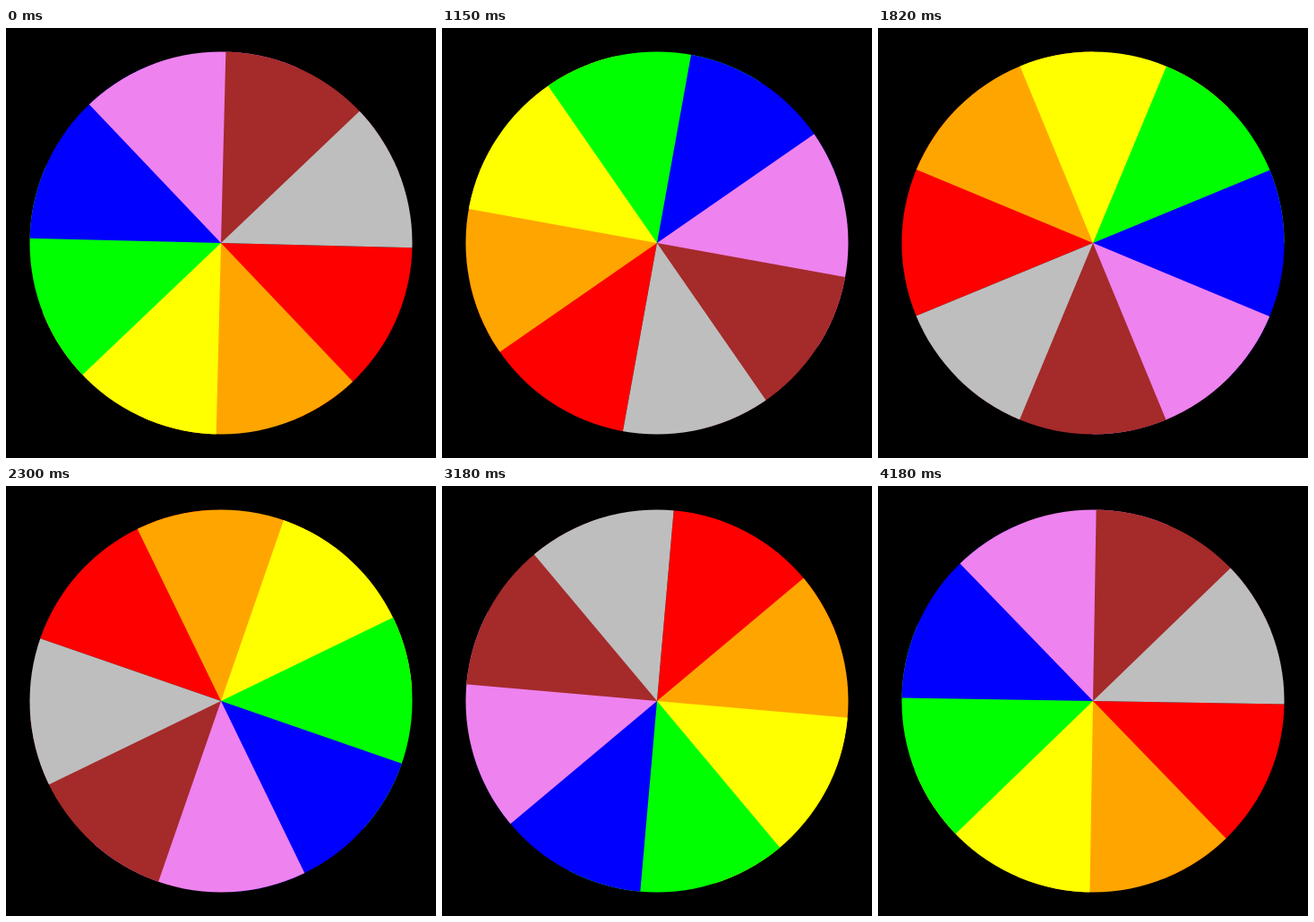
Recreate the animation shown at these times as an HTML page with a canvas. Size 480x480 px, loop 4210 ms.

```html
<!DOCTYPE html>
<html lang="en">
<head>
<meta charset="utf-8">
<title>Colour wheel</title>
<style>
html, body { margin: 0; width: 100%; height: 100%; overflow: hidden; background: #000; }
canvas { display: block; width: 480px; height: 480px; }
</style>
</head>
<body>
<canvas id="stage" width="480" height="480"></canvas>
<script>
const ctx = document.getElementById('stage').getContext('2d');
const COLORS = ['#ff0000', '#ffa500', '#ffff00', '#00ff00', '#0000ff', '#ee82ee', '#a52a2a', '#bebebe'];
const LOOP = 4210;
const CENTER = 240;
const RADIUS = 213.5;
const SLICE = Math.PI * 2 / COLORS.length;
const STEP = 0.025; // radians per 1/60 s tick

// 33 pictures per second on a 10 ms clock, each showing the latest 60 Hz tick
function angleAt(ms) {
  const picture = Math.floor((Math.floor(ms / 10) + 0.5) * 0.33);
  const tick = Math.round(picture * 60 / 33 + 0.25);
  return (tick + 1) * STEP;
}

function wedge(color, from, to) {
  ctx.fillStyle = color;
  ctx.beginPath();
  ctx.moveTo(CENTER, CENTER);
  ctx.arc(CENTER, CENTER, RADIUS + 20, from, to);
  ctx.fill();
}

function draw(ms) {
  const angle = angleAt(ms);
  ctx.fillStyle = '#000';
  ctx.fillRect(0, 0, 480, 480);
  ctx.save();
  ctx.beginPath();
  ctx.arc(CENTER, CENTER, RADIUS, 0, Math.PI * 2);
  ctx.clip();
  // each slice runs on under the next so that no seam shows
  COLORS.forEach((color, i) => {
    const from = angle + i * SLICE;
    const spare = i < COLORS.length - 1 ? SLICE / 2 : 0;
    wedge(color, from, from + SLICE + spare);
  });
  ctx.restore();
}

const start = performance.now();
function tick() {
  draw((performance.now() - start) % LOOP);
  requestAnimationFrame(tick);
}
tick();
</script>
</body>
</html>
```
